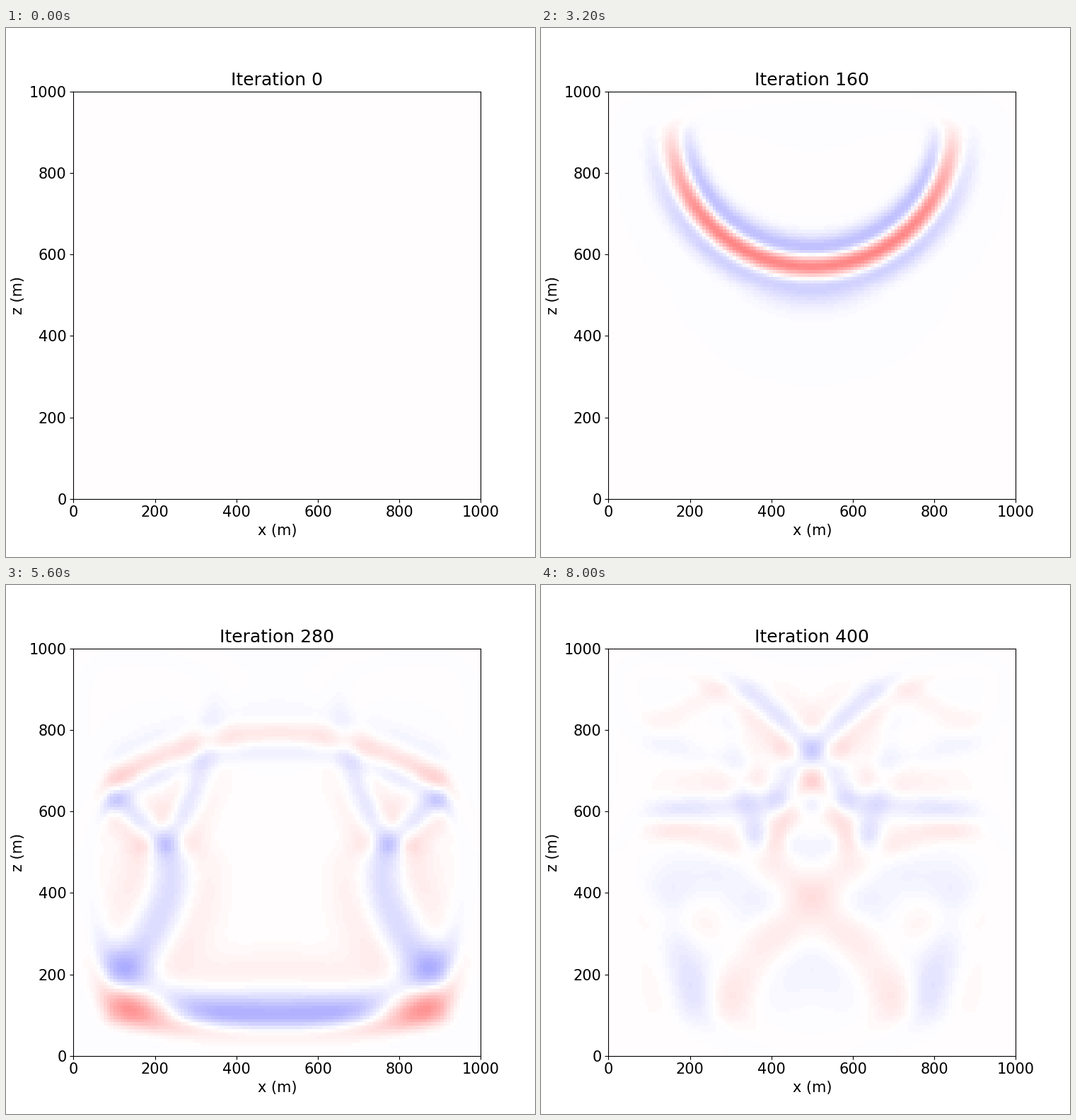
Animation, 748 px wide and 748 px high, one loop 8.2 s. Source, as a matplotlib script:

```python
import numpy as np
import matplotlib.pyplot as plt
from matplotlib.animation import FuncAnimation

SIZE, DPI = 748, 100
FRAMES, INTERVAL, STEPS = 41, 200, 10

# Grid of 101 x 101 cells inside an absorbing rim
RIM = 10
N = 101 + 2 * RIM
SRC = (RIM + 1, N // 2)
FREQ = 0.025               # cycles per time step
SLOW, FAST = 0.363, 0.606  # cells per time step
LOSS = 0.18                # damping gained per cell into the rim


def ricker(n):
    a = (np.pi * (FREQ * n - 1.1)) ** 2
    return (1 - 2 * a) * np.exp(-a)


def damping():
    i = np.arange(N)
    depth = np.maximum(RIM - np.minimum(i, N - 1 - i), 0)
    return LOSS * np.maximum(depth[:, None], depth[None, :])


def laplacian(p):
    q = np.pad(p, 1)
    return q[2:, 1:-1] + q[:-2, 1:-1] + q[1:-1, 2:] + q[1:-1, :-2] - 4 * p


def simulate():
    speed = np.full((N, N), SLOW)
    speed[RIM + 50:] = FAST
    c2 = speed ** 2
    half = damping() / 2
    old, now = np.zeros((N, N)), np.zeros((N, N))
    snaps = [now]
    for n in range(1, (FRAMES - 1) * STEPS + 1):
        new = (2 * now - (1 - half) * old + c2 * laplacian(now)) / (1 + half)
        new[SRC] += ricker(n)
        old, now = now, new
        if n % STEPS == 0:
            snaps.append(now)
    return np.array(snaps, dtype=np.float32)


fields = simulate()
limit = float(fields[8].max()) / 0.425

plt.rcParams["font.family"] = "DejaVu Sans"
plt.rcParams["font.size"] = 15
fig, ax = plt.subplots(figsize=(SIZE / DPI, SIZE / DPI), dpi=DPI)
image = ax.imshow(fields[0], cmap="seismic", vmin=-limit, vmax=limit,
                  extent=[0, 1000, 0, 1000], interpolation="nearest",
                  interpolation_stage="rgba")
ticks = range(0, 1001, 200)
ax.set_xticks(ticks)
ax.set_yticks(ticks)
ax.set_xlabel("x (m)")
ax.set_ylabel("z (m)")
title = ax.set_title("Iteration 0")


def update(k):
    image.set_data(fields[k])
    title.set_text(f"Iteration {k * STEPS}")
    return image, title


anim = FuncAnimation(fig, update, frames=FRAMES, interval=INTERVAL,
                     repeat=True, repeat_delay=0)
plt.show()
```
